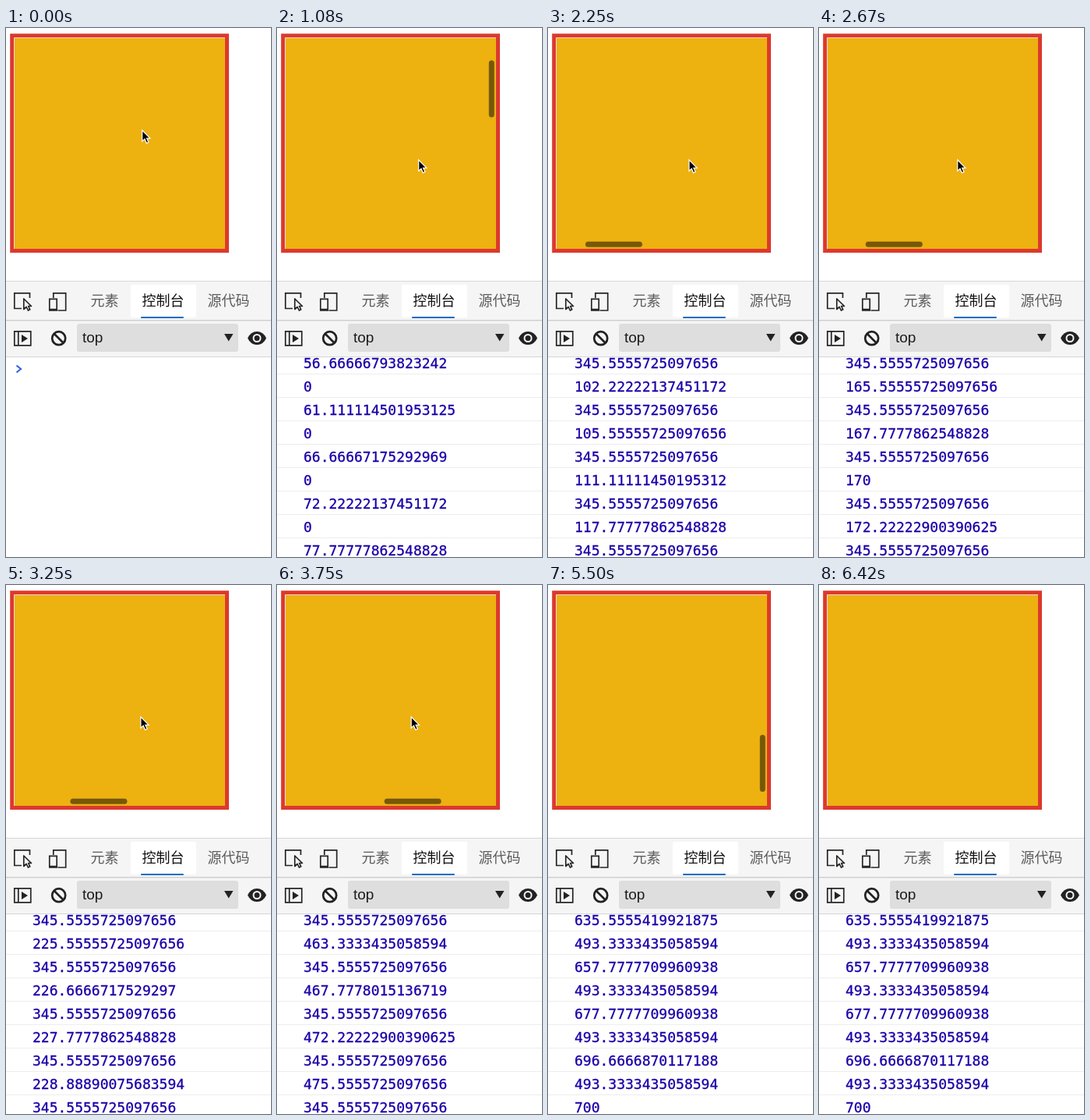
These frames come from a looping animation (340 by 678 pixels, 6.51 s). An HTML page:

```html
<!DOCTYPE html>
<html lang="zh">
<head>
<meta charset="utf-8">
<title>Scroll log</title>
<style>
  html, body { margin: 0; width: 100%; height: 100%; overflow: hidden; background: #fff; }
  svg { display: block; width: 340px; height: 678px; }
  .tab { font: 18px "Noto Sans CJK SC", "Noto Sans CJK", sans-serif; fill: #5c5c5c; }
  .log { font: 18px "DejaVu Sans Mono", monospace; fill: #1a01a8; stroke: #1a01a8; stroke-width: .3; }
  .line { fill: none; stroke: #262626; stroke-width: 1.7; }
</style>
</head>
<body>
<svg viewBox="0 0 340 678">
  <defs><clipPath id="panel"><rect y="422" width="340" height="256"/></clipPath></defs>
  <rect width="340" height="678" fill="#fff"/>

  <path d="M5.2 7.2H286V288H5.2Z" fill="#dc392d"/>
  <path d="M10.2 12.2H281V283H10.2Z" fill="#fff"/>
  <path d="M11 13H281V283H11Z" fill="#edb110"/>
  <rect id="barV" x="271.8" width="7" height="73" rx="3.5"/>
  <rect id="barH" y="273.8" width="73" height="7" rx="3.5"/>
  <path id="pointer" d="M0 0V14.2L3.3 11.3L5.6 16.6L8.2 15.5L5.9 10.4H10.2Z" stroke="#fff" stroke-width="1.2"/>

  <g clip-path="url(#panel)">
    <g id="rows"></g>
    <path id="prompt" d="M13.5 -4.5L19 0L13.5 4.5" fill="none" stroke="#3367e0" stroke-width="2.2"/>
  </g>

  <rect y="324" width="340" height="98" fill="#f5f5f5"/>
  <path d="M0 324.5H340M0 421.5H340" stroke="#d6d6d6"/>
  <path d="M0 374.5H340" stroke="#cfcfcf"/>
  <path d="M0 375.5H340" stroke="#e4e4e4"/>
  <rect x="160" y="329" width="84" height="42" rx="2" fill="#fff"/>
  <rect x="173" y="370" width="55" height="2" rx="1" fill="#0f6cc4"/>
  <text class="tab" x="108.5" y="356">元素</text>
  <text class="tab" x="174.5" y="356" style="fill:#111">控制台</text>
  <text class="tab" x="258.5" y="356">源代码</text>

  <path class="line" d="M20 359.5H10.8V339.8H30.5V346"/>
  <path class="line" d="M22.8 347V360.5L26.2 357.5L28.4 362L30.8 360.8L28.7 356.5H32.5Z" stroke-linejoin="round"/>
  <path class="line" d="M60.8 346V339.8H76.7V362H66.5"/>
  <path class="line" d="M55.8 347.3H65.2V362H55.8ZM55.8 360.5H65.2"/>
  <path class="line" d="M10.8 388.8H31.8V406.8H10.8ZM15.8 388.8V406.8"/>
  <path d="M20 393V403L28 398Z" fill="#222"/>
  <g fill="none" stroke="#222" stroke-width="2.7">
    <circle cx="67.7" cy="397.7" r="8.5"/>
    <path d="M61.7 391.7L73.7 403.7"/>
  </g>
  <rect x="91" y="379" width="207" height="36" rx="3" fill="#dedede"/>
  <text x="98" y="403" font-size="19" font-family="Liberation Sans, Arial, sans-serif" fill="#1c1c1c">top</text>
  <path d="M280 392H291.5L285.7 401.5Z" fill="#222"/>
  <path d="M310 397.5Q314 389 322 389T334 397.5Q330 406 322 406T310 397.5Z" fill="#222"/>
  <circle cx="322" cy="397.5" r="4.5" fill="#222" stroke="#f5f5f5" stroke-width="2"/>
</svg>
<script>
  const LOOP = 6510, FRAME = 250 / 3, LAST_FRAME = 77;
  const TICKS = 5;      // scroll ticks per picture
  const LOG_LAG = 5;    // the console trails the scrollbars
  const ROW = 30;

  const clamp01 = x => Math.max(0, Math.min(1, x));
  const smooth = x => (x = clamp01(x)) * x * (3 - 2 * x);

  // A flick speeds up evenly, holds its speed, then slows down evenly.
  const flick = (start, full, slow, end, speed) => tick => {
    const rise = full - start, fall = end - slow;
    const up = clamp01((tick - start) / rise);
    const hold = Math.max(0, Math.min(tick, slow) - full);
    const down = clamp01((tick - slow) / fall);
    return speed * (rise * up * up / 2 + hold + fall * (down - down * down / 2));
  };
  const scroller = (limit, ...flicks) => tick =>
    Math.min(limit, flicks.reduce((sum, move) => sum + move(tick), 0));

  const scrollTop = scroller(630,
    flick(38, 79.4, 79.4, 116.81, 7.892),
    flick(240.5, 245.9, 250.61, 269.09, 24.85));
  const scrollLeft = scroller(444,
    flick(119, 123, 123, 131, 15.3),
    flick(131, 132.33, 135, 139, 6),
    flick(140, 150, 150, 225, 2.262),
    flick(194, 199.7, 199.7, 234, 11.2));

  // Page zoom of 90 % in single precision
  const cssPixels = n => String(Math.fround(n / Math.fround(0.9)));
  const thumb = n => n / 630 * 178;

  const events = [];
  for (let tick = 1, top = 0, left = 0; tick <= LAST_FRAME * TICKS; tick++) {
    const newTop = Math.ceil(scrollTop(tick));
    const newLeft = Math.ceil(scrollLeft(tick));
    if (newTop === top && newLeft === left) continue;
    [top, left] = [newTop, newLeft];
    events.push({ tick, lines: [cssPixels(top), cssPixels(left)] });
  }

  const el = id => document.getElementById(id);
  const make = (name, attrs) => {
    const node = document.createElementNS("http://www.w3.org/2000/svg", name);
    for (const key in attrs) node.setAttribute(key, attrs[key]);
    return node;
  };
  const moveTo = (node, x, y) => node.setAttribute("transform", `translate(${x} ${y})`);

  const rows = Array.from({ length: 10 }, () => {
    const group = make("g", {});
    const text = make("text", { class: "log", x: 34, y: 6 });
    group.append(text, make("path", { d: "M0 13.5H340", stroke: "#ededed" }));
    el("rows").append(group);
    return { group, text };
  });

  function drawLog(tick) {
    const lines = events.filter(e => e.tick <= tick).flatMap(e => e.lines);
    const scroll = Math.max(0, ROW * lines.length - 293);
    const first = Math.floor(scroll / ROW);
    const rowY = i => 437 + ROW * i - scroll;
    rows.forEach(({ group, text }, i) => {
      const line = lines[first + i];
      group.style.display = line === undefined ? "none" : "";
      text.textContent = line ?? "";
      moveTo(group, 0, rowY(first + i));
    });
    moveTo(el("prompt"), 0, rowY(lines.length));
  }

  function drawBars(frame, tick) {
    const sideways = frame >= 24 && frame < 48;
    const fade = clamp01((76 - frame) / 5);
    el("barV").setAttribute("y", 14 + thumb(scrollTop(tick)));
    el("barH").setAttribute("x", 13 + thumb(scrollLeft(tick)));
    el("barV").setAttribute("opacity", frame < 8 || sideways ? 0 : fade / 2);
    el("barH").setAttribute("opacity", sideways ? 0.5 : 0);
  }

  function drawPointer(frame) {
    const enter = smooth(frame / 5), drift = smooth((frame - 24) / 18);
    moveTo(el("pointer"), 174.7 + 7 * enter - 9.5 * drift, 131 + 38 * enter);
    el("pointer").style.display = frame < 64 ? "" : "none";
  }

  function draw(time) {
    const frame = Math.min(LAST_FRAME, Math.floor((time + 5) / FRAME));
    drawLog(frame * TICKS);
    drawBars(frame, frame * TICKS + LOG_LAG);
    drawPointer(frame);
  }

  const start = performance.now();
  function loop() {
    draw((performance.now() - start) % LOOP);
    requestAnimationFrame(loop);
  }
  loop();
</script>
</body>
</html>
```
